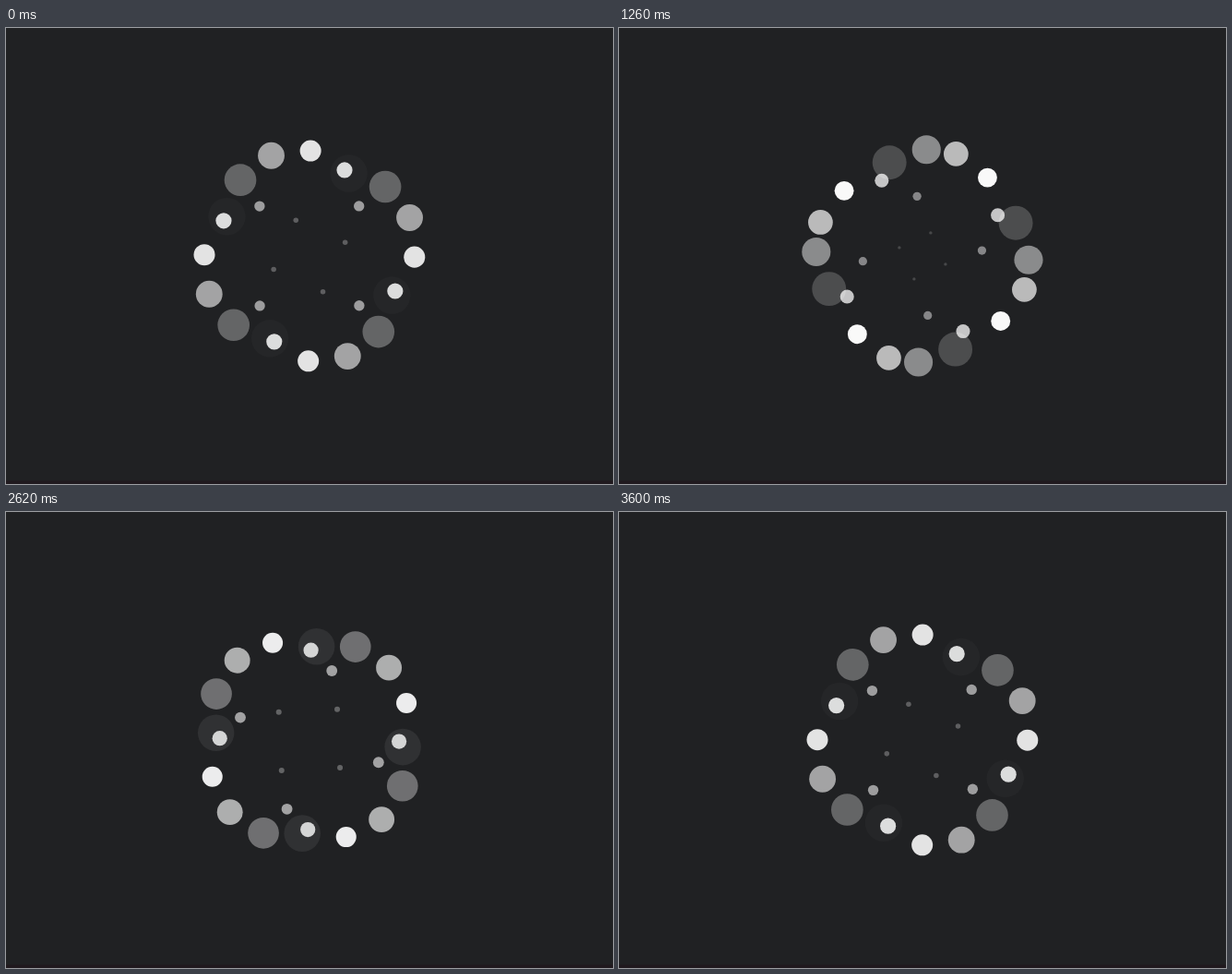
Recreate the animation shown at these times as an HTML page. Size 658 by 494 pixels, loop 3.62 s.

```html
<!DOCTYPE html>
<html lang="en">
<head>
<meta charset="utf-8">
<title>Spiral loader</title>
<style>
  html, body { margin: 0; width: 100%; height: 100%; overflow: hidden; background: #202123; }
  svg { display: block; }
</style>
</head>
<body>
<svg id="stage" width="658" height="494" viewBox="0 0 658 494">
  <rect width="658" height="494" fill="#202123"/>
  <rect y="490.5" width="658" height="3.5" fill="#20191e"/>
  <g id="dots" fill="#fff"></g>
</svg>
<script>
const LOOP = 3620, TICK = 20;
const ARMS = 4, PER_ARM = 7;
const CYCLE = 3600, GAP = 1600 / 3, LEAD = 45;
const CX = 328.9, CY = 246.9;

// Distance and angle along the inward spiral, one knot per 400 ms of age,
// starting one knot before birth.
const STEP = 400;
const DIST = [84, 97.8, 107.9, 114.2, 116.4, 114.5, 106.2, 91.6, 71.2, 44.7, 13.4, -22, -60];
const TURN = [-84, -66.4, -49.6, -33.4, -17.3, -1.2, 15, 31.5, 48.8, 67.2, 86.2, 106, 126];

const group = document.getElementById('dots');
const dots = Array.from({ length: ARMS * PER_ARM }, () => {
  const dot = document.createElementNS('http://www.w3.org/2000/svg', 'circle');
  return group.appendChild(dot);
});

// Catmull-Rom interpolation between knots
function curve(knots, age) {
  const x = age / STEP, i = Math.floor(x), f = x - i;
  const [a, b, c, d] = knots.slice(i, i + 4);
  return b + f / 2 * (c - a + f * (2 * a - 5 * b + 4 * c - d + f * (3 * (b - c) + d - a)));
}

function draw(t) {
  const spin = 90 * t / LOOP;
  for (let k = 0; k < PER_ARM; k++) {
    const age = (t + LEAD + k * GAP) % CYCLE;
    const dist = curve(DIST, age);
    const size = 20.5 * (1 - age / 3750);
    const alpha = Math.min(age, 3770 - age) / 1885;
    for (let arm = 0; arm < ARMS; arm++) {
      const angle = (curve(TURN, age) + spin + arm * 90) * Math.PI / 180;
      const dot = dots[k * ARMS + arm];
      dot.setAttribute('cx', (CX + dist * Math.sin(angle)).toFixed(2));
      dot.setAttribute('cy', (CY - dist * Math.cos(angle)).toFixed(2));
      dot.setAttribute('r', size.toFixed(2));
      dot.setAttribute('fill-opacity', alpha.toFixed(3));
    }
  }
}

const start = performance.now();
function frame() {
  const t = (performance.now() - start) % LOOP;
  draw(Math.floor(t / TICK) * TICK);
  requestAnimationFrame(frame);
}
draw(0);
requestAnimationFrame(frame);
</script>
</body>
</html>
```
